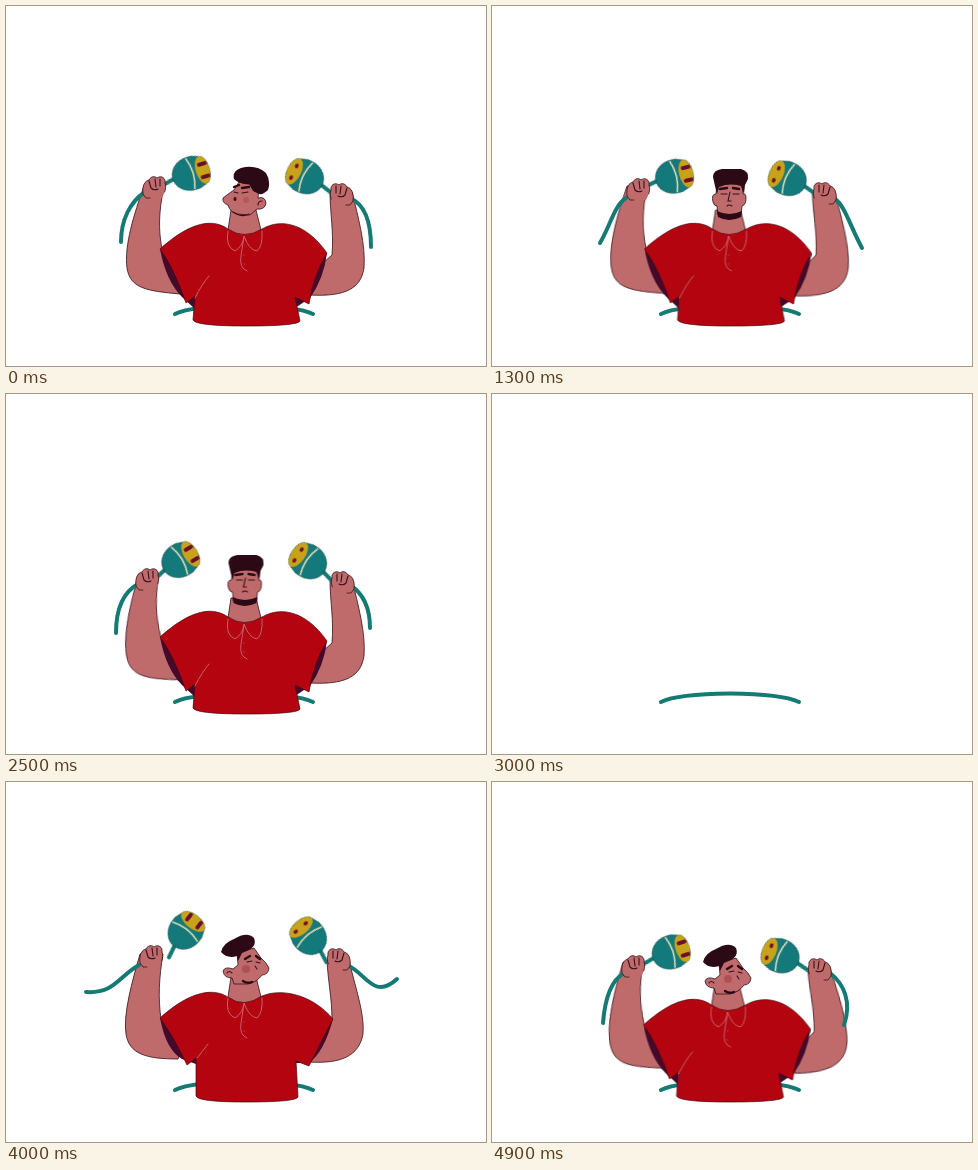
Recreate the animation shown at these times as an HTML page without scripts. Size 480 by 360 pixels, loop 5000 ms.

```html
<!DOCTYPE html>
<html lang="en">
<head>
<meta charset="utf-8">
<title>Plugging in</title>
<style>
html, body { margin: 0; width: 100%; height: 100%; overflow: hidden; background: #fff; }
svg { display: block; width: 100vw; height: 100vh; }

/* steps(2) over 4% of the loop moves once every 100 ms */
.a { animation: 5s steps(2) infinite; }
.show { animation: 5s step-end infinite; }

.skin { fill: #bf6b6b; stroke: #35101a; stroke-width: .8; }
.teal { fill: #13797a; stroke: #0b3f45; stroke-width: .6; }
.cord { fill: none; stroke: #157a74; stroke-width: 4; stroke-linecap: round; }
.line { fill: none; stroke: #35101a; stroke-width: 1.1; stroke-linecap: round; }
.brow { fill: none; stroke: #2b0a16; stroke-width: 2.4; stroke-linecap: round; }
.seam { fill: none; stroke: #c6626a; stroke-width: 1; stroke-linecap: round; }
.hair { fill: #2b0a16; }
.cheek { fill: #a8474f; }
.ring { fill: none; stroke: #e9dfb8; stroke-width: 1.5; }
.prong { fill: none; stroke: #6b0f2a; stroke-width: 4; stroke-linecap: round; }

/* visibility */
.person { animation-name: person; }
@keyframes person { 0%, 74% { visibility: visible } 60% { visibility: hidden } }
.left { animation-name: left; }
@keyframes left { 0% { opacity: 1 } 8%, 100% { opacity: 0 } }
.long { animation-name: long; }
@keyframes long { 0%, 20%, 100% { opacity: 0 } 8% { opacity: 1 } }
.front { animation-name: front; }
@keyframes front { 0%, 60%, 100% { opacity: 0 } 20% { opacity: 1 } }
.right { animation-name: right; }
@keyframes right { 0% { opacity: 0 } 74%, 100% { opacity: 1 } }
.bolt { animation-name: bolt; }
@keyframes bolt { 0%, 20%, 100% { opacity: 0 } 10% { opacity: 1 } }
.joint { animation-name: joint; }
@keyframes joint { 0%, 20%, 60%, 78%, 100% { opacity: 0 } 8%, 54%, 74% { opacity: 1 } }

/* body */
.torso { animation-name: torso; }
@keyframes torso {
  0%, 18%, 36%, 80% { transform: translate(0, 0) }
  22%, 26% { transform: translate(-1.5px, 0) }
  84%, 100% { transform: translate(-2.5px, 0) }
}
.shirt { fill: #b3040f; stroke: #4a0512; stroke-width: .7; animation-name: shirt; }
@keyframes shirt {
  0%, 4%, 22%, 50%, 84%, 100% { d: path("M222 223 C208 213 186 214 154 243 Q168 262 180 297 L189 290 L187 314 Q190 320 240 320 Q292 320 294 315 L289 291 L303 298 Q307 270 321 247 C300 217 275 212 256 223 Q238 234 222 223Z") }
  8%, 18%, 54%, 76% { d: path("M222 224 C210 215 190 215 169 215 Q167 240 170 273 L187 267 L187 314 Q190 319 240 319 Q292 319 294 316 L293 263 L309 267 Q309 235 304 209 C280 209 270 214 256 222 Q238 233 222 224Z") }
  80% { d: path("M223 216 C210 206 186 207 154 236 Q168 255 181 283 L190 276 L190 314 Q192 320 240 320 Q290 320 292 315 L290 279 L303 284 Q314 262 327 237 C306 212 275 206 256 214 Q238 226 223 216Z") }
}
.lining { fill: #430a2b; animation-name: lining; }
@keyframes lining {
  0%, 4%, 22%, 50%, 84%, 100% { d: path("M154 243 Q160 275 176 291 L189 303 L189 285Z M321 247 Q318 272 304 292 L289 302 L289 285Z") }
  8%, 18%, 54%, 76% { d: path("M169 215 Q165 245 171 266 L187 270 L187 260Z M304 209 Q313 240 310 267 L293 264 L293 260Z") }
  80% { d: path("M154 236 Q160 268 176 277 L190 282 L190 270Z M327 237 Q318 270 303 281 L290 281 L290 270Z") }
}
.crease { animation-name: crease; }
@keyframes crease {
  0%, 4%, 22%, 50%, 84%, 100% { d: path("M203 270 Q196 278 189 292") }
  8%, 18%, 54%, 76% { d: path("M187 269 Q197 266 203 260") }
  80% { d: path("M202 262 Q196 270 191 276") }
}
.collar { animation-name: collar; }
@keyframes collar {
  0%, 76%, 84%, 100% { transform: translate(0, 0) }
  80% { transform: translate(0, -9px) }
}

/* arms */
.armL { transform-origin: 140px 265px; animation-name: armL, leanL; }
@keyframes armL {
  0%, 4%, 22%, 50%, 84%, 100% { d: path("M138 180 C128 208 118 240 121 262 C124 282 140 285 174 288 L176 270 L156 243 C152 222 153 205 158 180Z") }
  8%, 18%, 54%, 76% { d: path("M171 156 C155 178 134 206 128 224 C125 242 140 257 172 262 L176 240 L167 217 C170 200 185 180 194 155Z") }
  80% { d: path("M134 172 C126 200 117 232 120 252 C123 272 140 277 172 277 L178 262 L155 237 C152 216 153 196 157 172Z") }
}
@keyframes leanL {
  0%, 18%, 54%, 80% { transform: rotate(0deg) }
  22%, 26% { transform: rotate(-1deg) }
  36%, 50% { transform: rotate(-3.5deg) }
  84%, 100% { transform: rotate(-3deg) }
}
.armR { transform-origin: 338px 268px; animation-name: armR, leanR; }
@keyframes armR {
  0%, 4%, 22%, 50%, 84%, 100% { d: path("M346 186 C352 210 360 240 358 262 C355 282 340 291 304 289 L300 272 L326 249 C328 225 324 208 324 186Z") }
  8%, 18%, 54%, 76% { d: path("M304 148 C322 172 345 196 352 214 C355 230 340 245 308 250 L300 235 L305 209 C302 190 290 170 281 152Z") }
  80% { d: path("M343 178 C349 205 359 232 357 252 C353 274 335 282 303 280 L300 265 L326 238 C326 216 322 200 321 178Z") }
}
@keyframes leanR {
  0%, 18%, 36%, 80% { transform: rotate(0deg) }
  22%, 26% { transform: rotate(-1.5deg) }
  84%, 100% { transform: rotate(-4deg) }
}
.handL { animation-name: handL; }
@keyframes handL {
  0%, 4% { transform: translate(149px, 181px) }
  8%, 18%, 54%, 76% { transform: translate(182px, 153px) }
  22%, 26% { transform: translate(147px, 183px); animation-timing-function: steps(5) }
  36% { transform: translate(144px, 180px) }
  42%, 50% { transform: translate(142px, 185px) }
  80% { transform: translate(146px, 174px) }
  84%, 100% { transform: translate(142px, 184px) }
}
.handR { animation-name: handR; }
@keyframes handR {
  0%, 4% { transform: translate(335px, 188px) }
  8%, 18%, 54%, 76% { transform: translate(292px, 147px) }
  22%, 26% { transform: translate(332px, 187px); animation-timing-function: steps(5) }
  36% { transform: translate(335px, 183px) }
  42%, 50% { transform: translate(336px, 188px) }
  80% { transform: translate(332px, 177px) }
  84%, 100% { transform: translate(327px, 187px) }
}

/* plugs */
.plugL { animation-name: plugL; }
@keyframes plugL {
  0%, 4% { transform: translate(167px, 173px) rotate(-17deg) }
  8%, 18%, 54%, 76% { transform: translate(204px, 147px) rotate(-6deg) }
  22%, 26% { transform: translate(164px, 175px) rotate(-14deg); animation-timing-function: steps(5) }
  36% { transform: translate(158px, 172px) rotate(-30deg) }
  42%, 50% { transform: translate(158px, 176px) rotate(-31deg) }
  80% { transform: translate(168px, 164px) rotate(-52deg) }
  84%, 100% { transform: translate(161px, 176px) rotate(-18deg) }
}
.plugR { animation-name: plugR; }
@keyframes plugR {
  0%, 4% { transform: translate(316px, 179px) rotate(26deg) }
  8%, 18%, 54%, 76% { transform: translate(269px, 144px) rotate(2deg) }
  22%, 26% { transform: translate(313px, 180px) rotate(23deg); animation-timing-function: steps(5) }
  36% { transform: translate(317px, 174px) rotate(34deg) }
  42%, 50% { transform: translate(318px, 178px) rotate(34deg) }
  80% { transform: translate(315px, 169px) rotate(50deg) }
  84%, 100% { transform: translate(306px, 181px) rotate(22deg) }
}
.cordL { animation-name: cordL; }
@keyframes cordL {
  0%, 4% { d: path("M139 186 C124 196 115 214 115 236") }
  8%, 18%, 54%, 76% { d: path("M171 160 C158 172 147 190 146 208") }
  22%, 26% { d: path("M134 192 C122 200 119 218 108 237"); animation-timing-function: steps(5) }
  36%, 50% { d: path("M132 190 C114 200 110 220 110 239") }
  80% { d: path("M133 183 C112 195 108 212 80 210") }
  84%, 100% { d: path("M132 191 C120 198 113 215 111 241") }
}
.cordR { animation-name: cordR; }
@keyframes cordR {
  0%, 4% { d: path("M344 192 C358 198 365 215 365 241") }
  8%, 18%, 54%, 76% { d: path("M303 151 C318 156 332 172 338 191") }
  22%, 26% { d: path("M343 193 C353 200 358 220 370 242"); animation-timing-function: steps(5) }
  36%, 50% { d: path("M344 191 C358 200 364 214 364 234") }
  80% { d: path("M343 184 C360 192 368 218 391 197") }
  84%, 96% { d: path("M340 192 C356 198 372 212 381 224"); }
  98%, 100% { d: path("M338 191 C352 202 360 220 352 243") }
}

/* head drift */
.nod { animation-name: nod; }
@keyframes nod {
  0%, 26% { transform: translate(0, 0); animation-timing-function: steps(5) }
  36%, 60% { transform: translate(1.5px, -2px) }
}
.turn { animation-name: turn; }
@keyframes turn {
  0%, 76% { transform: translate(-2px, 9px) }
  80% { transform: translate(0, 0) }
  84%, 100% { transform: translate(-4px, 10px) }
}
</style>
</head>
<body>
<svg viewBox="0 0 480 360">
  <defs>
    <g id="bulb">
      <path class="cord" stroke-width="3" d="M2 0 L-12 3"/>
      <path class="teal" d="M0 -2 C2 -14 14 -18 24 -16.5 L31 -14 A7 14 0 0 1 31 14 L24 16.5 C14 18 2 14 0 2Z"/>
      <path class="ring" d="M18 -16 Q24 0 18 16"/>
      <ellipse cx="31" cy="0" rx="7" ry="14" fill="#c9a21c"/>
    </g>
    <g id="fist">
      <path class="skin" d="M-12 7 C-13 -2 -10 -6 -6 -7 C-4 -11 0 -11 2 -9 C6 -12 11 -9 10 -4 C12 1 9 7 7 11 L-9 11Z" stroke-dasharray="48 18"/>
      <path class="line" d="M-6 -6 L-4 1 M0 -8 L1 0 M5 -8 L5 -1 M-4 1 Q-1 4 3 2"/>
    </g>
  </defs>

  <path class="cord" d="M169 308 Q185 300 238 299.5 Q290 300 307 308"/>

  <g class="show person">
    <g class="show long">
      <path fill="#110408" d="M211 161 Q230 150 256 160 Q272 187 290 206 Q275 213 255 222 L222 222 Q200 215 192 210 Q206 190 211 161Z"/>
    </g>
    <g class="a torso">
      <path class="a skin armL" d="M138 180 C128 208 118 240 121 262 C124 282 140 285 174 288 L176 270 L156 243 C152 222 153 205 158 180Z"/>
      <path class="a skin armR" d="M346 186 C352 210 360 240 358 262 C355 282 340 291 304 289 L300 272 L326 249 C328 225 324 208 324 186Z"/>
      <path class="a lining"/>
      <g class="a collar"><path class="skin" d="M225 204 L250 204 L255 224 Q238 238 222 224Z"/></g>
      <path class="a shirt"/>
      <path class="a seam crease"/>
      <g class="a collar">
        <path class="seam" d="M222 225 Q219 241 229 245 Q237 240 238 230 Q243 244 251 245 Q257 240 256 225 M238 231 L235 250 Q233 262 241 265"/>
        <path class="seam" stroke-width="2" d="M238 249 h.2 M238 258 h.2"/>
      </g>
    </g>

    <g class="show left">
      <path class="skin" d="M233 176 L228 184 Q222 188 217 192 Q216 197 222 199 Q224 206 231 208 L244 209 L251 203 Q259 204 260 197 Q259 190 252 192 L253 180Z"/>
      <path class="hair" d="M228 173 Q226 165 235 162 Q250 158 260 167 Q265 175 262 184 Q257 189 253 188 L247 185 L243 178 Q234 179 228 173Z"/>
      <path class="brow" d="M228 181 L233 179 M236 182 L243 181"/>
      <path class="line" d="M228 186 L232 187 M236 187 L242 186 M252 199 Q252 195 256 195 M227 206 Q236 212 243 208"/>
      <ellipse cx="229" cy="193" rx="1.5" ry="2" fill="#3a0a18"/>
      <circle class="cheek" cx="240" cy="194" r="3" opacity=".5"/>
    </g>

    <g class="show long">
      <path class="skin" d="M229 177 Q245 174 253 188 Q255 202 249 210 L250 224 Q238 232 226 224 L225 214 Q214 214 213 207 Q216 200 223 203 Q225 190 229 177Z"/>
      <path class="hair" d="M209 164 Q228 156 246 166 Q256 180 256 192 Q247 183 240 180 L231 178 Q230 192 223 202 Q214 199 211 209 Q200 200 205 182Z"/>
      <path class="brow" d="M227 185 L233 181 M240 184 L246 187"/>
      <path class="line" d="M229 188 L235 189 M241 191 L246 192 M217 208 Q220 205 222 208 M240 206 L244 206"/>
      <circle class="cheek" cx="233" cy="198" r="4" opacity=".65"/>
    </g>

    <g class="show front">
      <g class="a nod">
        <path class="skin" d="M225 178 L224 188 Q219 188 221 196 Q222 200 225 200 L226 209 Q237 217 249 209 L250 200 Q254 199 254 192 Q254 187 251 188 L250 178Z"/>
        <path class="hair" d="M221 171 Q221 164 230 163 L249 163 Q257 165 256 173 L253 179 L252 188 L249 180 Q238 176 227 181 L225 188 L223 180Z"/>
        <path fill="#2b0a16" d="M225 205 Q237 211 250 205 L249 211 Q237 217 226 211Z"/>
        <path class="brow" d="M228 183 L235 182 M241 182 L247 183"/>
        <path class="line" d="M229 188 H235 M241 188 H247 M238 186 L236 195 H239 M235 200 Q237 198 240 200"/>
      </g>
    </g>

    <g class="show right">
      <g class="a turn">
        <path class="skin" d="M231 171 L248 166 L255 176 Q260 180 263 186 Q262 193 256 193 Q251 200 242 202 L228 202 L226 196 Q218 196 217 189 Q219 184 227 187 L232 183Z"/>
        <path class="hair" d="M215 170 Q217 161 228 157 Q241 149 248 156 Q251 164 243 168 L236 171 L232 179 L231 174 Q221 177 215 170Z"/>
        <path class="brow" d="M239 177 L244 174 M250 174 L254 177"/>
        <path class="line" d="M241 180 L246 179 M250 180 L254 181 M221 191 Q223 188 226 191 M249 184 L251 187"/>
        <path class="brow" d="M237 199 Q241 202 246 200"/>
        <circle class="cheek" cx="240" cy="187" r="4" opacity=".75"/>
      </g>
    </g>

    <path class="a cord cordL"/>
    <path class="a cord cordR"/>
    <g class="a plugL">
      <use href="#bulb"/>
      <path class="prong" d="M29 -6 H35 M29 7 H35"/>
    </g>
    <g class="a plugR">
      <g transform="scale(-1 1)">
        <use href="#bulb"/>
        <ellipse cx="31" cy="-6" rx="1.8" ry="2.4" fill="#6b0f2a"/>
        <ellipse cx="31" cy="7" rx="1.8" ry="2.4" fill="#6b0f2a"/>
      </g>
    </g>
    <g class="show joint">
      <path fill="#13797a" d="M219 129 Q236 125 254 128 L254 159 Q236 161 219 159Z"/>
      <path class="ring" d="M223 129 Q229 144 225 159 M250 129 Q245 144 250 159"/>
      <path fill="#5a0f2a" d="M232 127 H239 V160 H232Z"/>
      <path fill="none" stroke="#c9a21c" stroke-width="2" stroke-dasharray="6 4" d="M234 129 V159"/>
    </g>
    <g class="a handL"><use href="#fist"/></g>
    <g class="a handR"><use href="#fist" transform="scale(-1 1)"/></g>

    <path class="show bolt" fill="#cc9f14" stroke="#4a3508" stroke-width=".7" d="M239 41 L252 38 L243 65 L257 63 L230 100 L236 76 L224 76Z"/>
  </g>
</svg>
</body>
</html>
```
